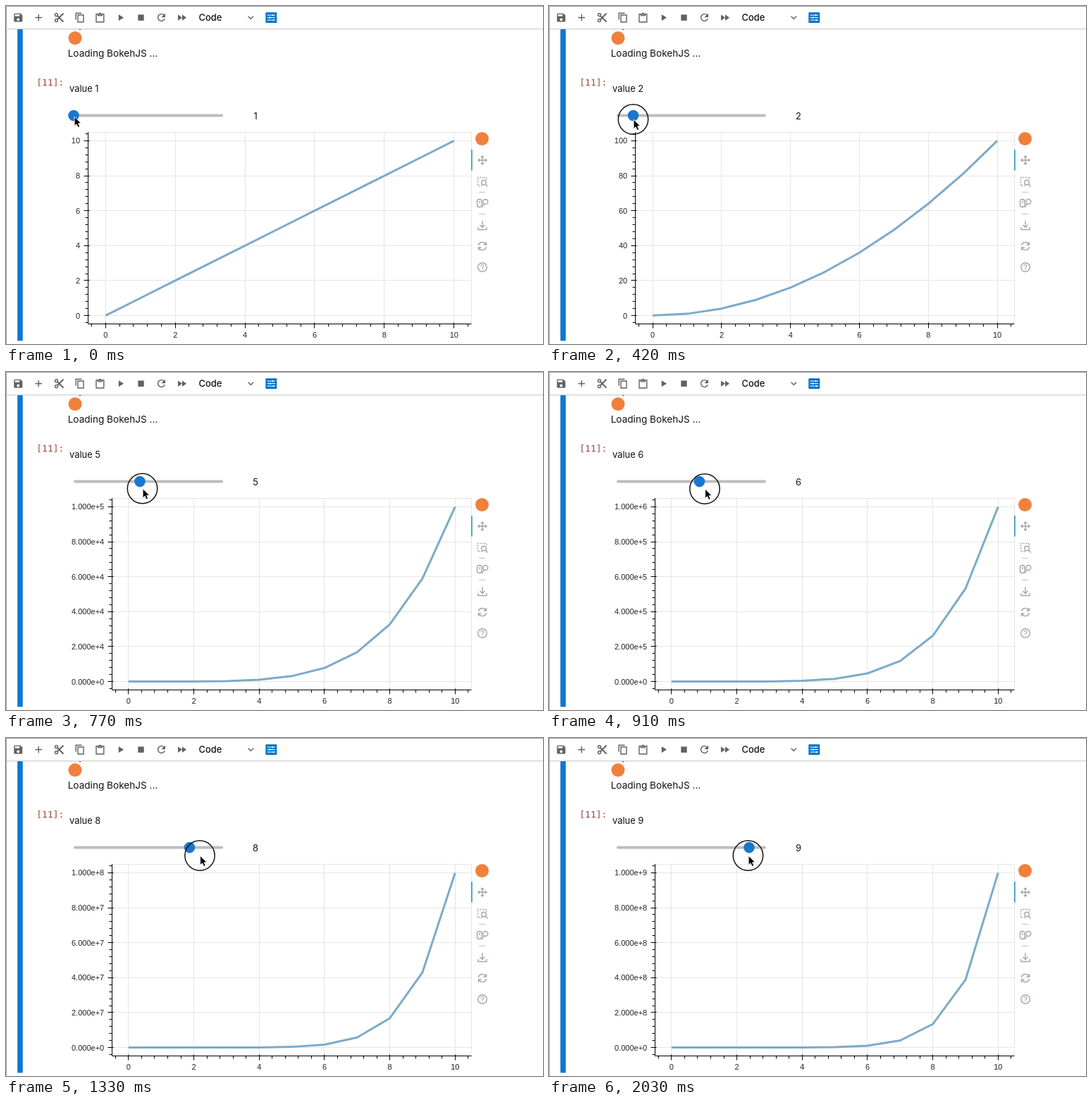
Animation of 762x480 px, one loop 2.17 s. Source, as an HTML page:

```html
<!DOCTYPE html>
<html lang="en">
<head>
<meta charset="utf-8">
<title>Slider and power curve</title>
<style>
  html, body { margin: 0; width: 100%; height: 100%; overflow: hidden; background: #fff; }
  svg { display: block; width: 762px; height: 480px; }
  .ui { font: 12.9px Inter, sans-serif; fill: #111; }
  .axis { font: 11px "Liberation Sans", Arial, sans-serif; fill: #222; }
  .line { fill: none; stroke: #616161; stroke-width: 1.4; }
  .tool { fill: none; stroke: #a1a6a9; stroke-width: 1.4; }
</style>
</head>
<body>
<svg viewBox="0 0 762 480">
  <rect width="762" height="480" fill="#fff"/>
  <path d="M.5 480V.5H762" fill="none" stroke="#a4a4a4"/>
  <path d="M0 32.700H762" stroke="#c4c4c4"/>
  <rect x="16.200" y="33" width="7.600" height="442.500" rx="1" fill="#0c77d2"/>
  <rect x="104" y="33" width="2" height="1" fill="#444"/>

  <g fill="#616161">
    <path fill-rule="evenodd" d="M12.500 10.500H20.500L23.300 13.300V21.200Q23.300 22.500 22 22.500H12.600Q11.300 22.500 11.300 21.200V11.800Q11.300 10.500 12.500 10.500ZM12.700 11.800V14.500H19.300V11.800ZM17.300 17.200A2 2 0 1 0 17.300 21.200A2 2 0 1 0 17.300 17.200Z"/>
    <path d="M159.800 12V21L167 16.500ZM187.300 12.300H195.700V20.700H187.300ZM244 12.200V20.800L250 16.500ZM250 12.200V20.800L256 16.500Z"/>
    <path d="M226 10.500V16H220.500Z"/>
  </g>
  <g class="line">
    <path d="M41.500 16.500H51M46.300 11.700V21.200"/>
    <circle cx="71.500" cy="12.500" r="2"/><circle cx="71.500" cy="20.500" r="2"/>
    <path d="M73 14L81.500 22.500M73 19L81.500 10.500" stroke-width="1.9"/>
    <path d="M99.200 19.500V10.200H107.500M102 12.700H110V22.700H102Z"/>
    <path d="M128 11.500H138.800V22.700H128ZM130.500 11V13.500H136.300V11M132 10.500H135"/>
    <path d="M224.300 13A5 5 0 1 0 225.300 18"/>
    <path d="M343.500 14.500L347.300 18.300L351.100 14.500"/>
  </g>
  <rect x="368.300" y="9" width="16" height="15" rx="1" fill="#0874c6"/>
  <path d="M370.500 13H382M370.500 16.500H382M370.500 20H382M378.500 11.800V14.200M374.500 15.300V17.700M379.500 18.800V21.200" stroke="#fff" stroke-width="1.2"/>
  <text class="ui" x="273.500" y="21" font-weight="500" style="font-weight:500">Code</text>

  <circle cx="98" cy="45.500" r="9.500" fill="#f0803c"/>
  <text class="ui" x="87.700" y="71.500" style="font-size:13.600px">Loading BokehJS ...</text>
  <text x="43.300" y="113" fill="#994a38" style="font:13px 'DejaVu Sans Mono',monospace">[11]:</text>
  <text class="ui" id="caption" x="90" y="122.200"></text>
  <text class="ui" id="readout" x="354" y="160.500" text-anchor="middle"></text>

  <g id="plot"></g>

  <circle cx="675.500" cy="188.500" r="9.500" fill="#f0803c"/>
  <path d="M660.900 204V233.500" stroke="#3b9fc6" stroke-width="1.800"/>
  <path d="M671 264.500H680M671 295.500H680" stroke="#d0d0d0" stroke-width="1.4"/>
  <g class="tool">
    <path d="M670 219H682M676 213V225M672 217L670 219L672 221M680 217L682 219L680 221M674 215L676 213L678 215M674 223L676 225L678 223"/>
    <path d="M676 255H669.500V243.500H682V247" stroke-dasharray="2 1.5"/>
    <circle cx="678" cy="250.500" r="3.300"/><path d="M680.500 253L683.500 256.500"/>
    <rect x="668.500" y="274.500" width="6.500" height="11" rx="3.200"/><path d="M671.800 277V280"/>
    <circle cx="680.300" cy="278" r="3.500"/><path d="M678 281L675.500 286"/>
    <path d="M676 305V314M672.500 311L676 314.500L679.500 311M670 314V317.500H682V314"/>
    <path d="M670.500 340A5.600 5.600 0 0 1 681 338.500M681.500 342A5.600 5.600 0 0 1 671 343.500M681.500 335V339H677.500M670.500 347V343H674.500"/>
    <circle cx="676" cy="371" r="6.300"/>
    <path d="M674 369.500Q674 367.500 676 367.500T678 369.500Q678 370.500 676 371.700V372.700M676 373.800V375" stroke-width="1.200"/>
  </g>

  <path d="M98 155.500H306" stroke="#bdbdbd" stroke-width="4" stroke-linecap="round"/>
  <circle id="handle" cy="155.600" r="7.800" fill="#1976d2"/>
  <g id="pointer">
    <circle id="ring" r="21.200" fill="none" stroke="#111" stroke-width="1.500"/>
    <path d="M.6 .2V13.400L3.600 10.700L5.700 15.400L8.200 14.300L6.100 9.700H10.200Z" fill="#000" stroke="#fff" stroke-width=".9"/>
  </g>
</svg>
<script>
const LOOP = 2170, STEP = 70;
const TOP = 179, BOTTOM = 452, RIGHT = 660.5;
const DIGIT_WIDTH = 6.12;
const VALUE_STARTS = [0, 420, 560, 700, 770, 910, 1050, 1190, 1400];
// Time, x, y of the pointer
const POINTER = [
  [0, 96.5, 157], [210, 96.5, 157], [280, 98.5, 157.5], [350, 106, 159],
  [420, 119.5, 161], [630, 162.5, 165], [770, 193.5, 165.5], [910, 221, 166],
  [1050, 245.4, 166], [1190, 263, 166.5], [1330, 275, 167], [1470, 280.5, 167],
  [1609, 280.5, 167], [1610, 281.8, 167], [2029, 281.8, 167], [2030, 282.5, 167], [LOOP, 282.5, 167]
];
const byId = id => document.getElementById(id);
const path = (d, color, width = 1) =>
  `<path d="${d}" fill="none" stroke="${color}" stroke-width="${width}" stroke-linejoin="round"/>`;
const label = (x, y, anchor, text) =>
  `<text class="axis" x="${x}" y="${y}" text-anchor="${anchor}">${text}</text>`;

function drawPlot(power) {
  // The axis moves right to make room for its widest label
  const left = power < 5 ? 116.6 + DIGIT_WIDTH * (power - 1) : 150.7;
  const xAt = n => left + (n + 0.5) * (RIGHT - left) / 11;
  const yAt = n => BOTTOM - (n + 0.5) * (BOTTOM - TOP) / 11;
  const snap = n => Math.floor(n) + 0.5;
  const axisX = snap(left), axisY = BOTTOM - 0.5;
  let grid = `M${axisX} ${TOP + .5}H${RIGHT}V${axisY}`, ticks = "", labels = "", curve = "";

  for (let i = -1; i <= 26; i++) {
    const n = i * 0.4, x = snap(xAt(n)), y = snap(yAt(n));
    const major = i % 5 === 0, inner = major ? 2 : 0, outer = major ? 6 : 4;
    ticks += `M${axisX - outer} ${y}H${axisX + inner}M${x} ${axisY - inner}V${axisY + outer}`;
    if (!major) continue;
    const tick = Math.round(n), amount = tick * 10 ** (power - 1);
    grid += `M${x} ${TOP}V${BOTTOM}M${left} ${y}H${RIGHT}`;
    labels += label(xAt(n), 471, "middle", tick);
    labels += label(left - 11.5, yAt(n) + 4, "end", power < 5 ? amount : amount.toExponential(3));
  }
  for (let n = 0; n <= 10; n++) {
    curve += `${n ? "L" : "M"}${xAt(n)} ${yAt(10 * (n / 10) ** power)}`;
  }
  byId("plot").innerHTML = path(grid, "#e5e5e5") + path(curve, "#7cabc8", 3)
    + path(`M${axisX} ${TOP}V${axisY}H${RIGHT}` + ticks, "#000") + labels;
}

function pointerAt(t) {
  const i = POINTER.findIndex(key => key[0] > t);
  const [t0, x0, y0] = POINTER[i - 1], [t1, x1, y1] = POINTER[i];
  const k = (t - t0) / (t1 - t0);
  return [x0 + (x1 - x0) * k, y0 + (y1 - y0) * k];
}

let shown = 0;
function render(time) {
  const t = Math.floor((time % LOOP) / STEP) * STEP;
  const value = VALUE_STARTS.filter(start => start <= t).length;
  if (value !== shown) {
    shown = value;
    drawPlot(value);
    byId("caption").textContent = `value ${value}`;
    byId("readout").textContent = value;
    byId("handle").setAttribute("cx", 96 + 23.5 * (value - 1));
  }
  byId("pointer").setAttribute("transform", `translate(${pointerAt(t)})`);
  byId("ring").setAttribute("visibility", t < 210 ? "hidden" : "visible");
}

const began = performance.now();
function tick() {
  render(performance.now() - began);
  requestAnimationFrame(tick);
}
tick();
</script>
</body>
</html>
```
